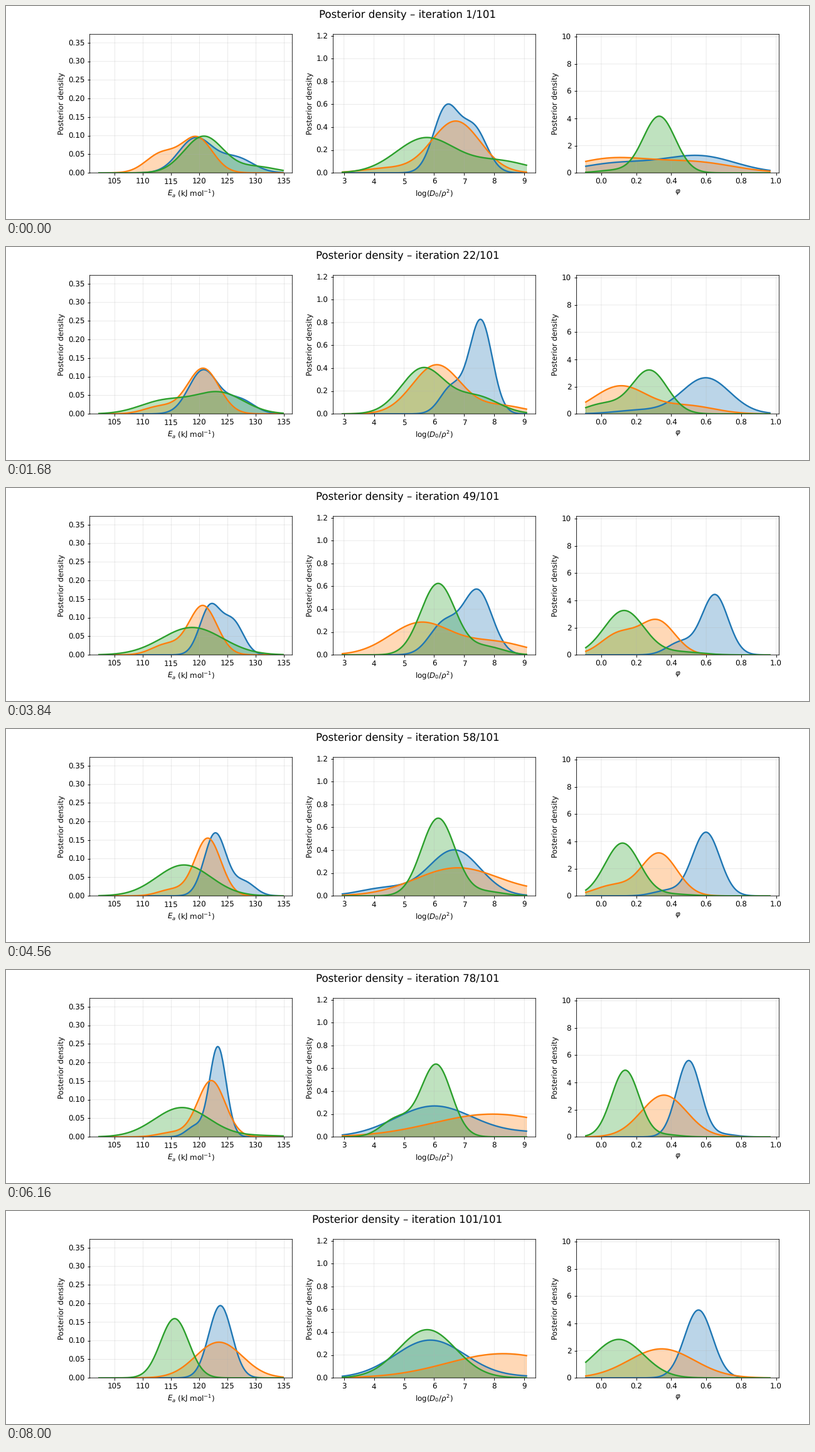
Write a matplotlib script that moves like this. It is 1280 px wide and 341 px high and loops after 8080 ms.

```python
import numpy as np
import matplotlib.pyplot as plt
from matplotlib.animation import FuncAnimation

W, H = 1280, 341
DPI = W / 15
STEPS, INTERVAL = 101, 80
KEY_STEPS = [0, 21, 31, 48, 66, 77, 100]
BLUE, ORANGE, GREEN = "tab:blue", "tab:orange", "tab:green"

# Unsnapped thin lines keep the soft look of a scaled-down figure.
plt.rcParams.update({"font.family": "DejaVu Sans", "text.hinting": "none",
                     "path.snap": False, "axes.linewidth": 0.72,
                     "grid.linewidth": 0.72})
fig = plt.figure(figsize=(15, H / DPI), dpi=DPI)
title = fig.suptitle("", fontsize=14)
chains = []


def panel(column, label, lo, hi, top):
    """Axes whose data span lo..hi, with a 5 % margin on both sides."""
    left = 133.5 + 388 * column
    ax = fig.add_axes([left / W, 1 - 267.2 / H, 322.8 / W, 221.9 / H])
    pad = 0.05 * (hi - lo)
    ax.set(xlim=(lo - pad, hi + pad), ylim=(0, top),
           xlabel=label, ylabel="Posterior density")
    ax.grid(alpha=0.3)
    return ax, np.linspace(lo, hi, 300)


def chain(target, color, *keys):
    """Each key holds centre, bandwidth and, if any, the side share."""
    ax, x = target
    line, = ax.plot(x, 0 * x, color=color, lw=2)
    area, = ax.fill(x, 0 * x, color=color, alpha=0.3, lw=1)
    tracks = np.transpose([(*key, 0)[:3] for key in keys])
    chains.append((x, line, area, tracks))


def density(x, centre, width, share):
    """Unit-area mix of a main and a side cluster with one bandwidth.

    The sign of share picks the side; smaller clusters sit further out.
    """
    weight = abs(share)
    z = (x - centre) / width
    offset = np.sign(share) * (3 - 2 * weight)
    bell = lambda u: np.exp(-u * u / 2) / (width * np.sqrt(2 * np.pi))
    return (1 - weight) * bell(z) + weight * bell(z - offset)


energy = panel(0, r"$E_a$ (kJ mol$^{-1}$)", 102.2, 134.8, 0.373)
chain(energy, BLUE, (119.3, 3, .3), (120.65, 2.55, .25), (122.1, 1.72, -.2),
      (121.9, 1.85, .4), (123.7, 2.03, -.04), (123.25, 1.48, -.1),
      (123.7, 2.05))
chain(energy, ORANGE, (119.55, 2.75, -.35), (120.65, 2.8, -.14),
      (121.4, 2.8, -.33), (120.6, 2.5, -.17), (122.35, 2.15, -.02),
      (122.1, 2.45, -.07), (123.45, 4.15))
chain(energy, GREEN, (120.75, 3.48, .14), (123.5, 4.35, -.38),
      (118.7, 3.5, -.33), (118.7, 5.4), (115.8, 4.18), (116.9, 4.85, .04),
      (115.6, 2.5))

diffusion = panel(1, r"log$(D_0/\rho^2)$", 2.947, 9.07, 1.213)
chain(diffusion, BLUE, (6.4, .425, .4), (7.55, .38, -.22), (7.6, .345, -.2),
      (7.45, .48, -.33), (5.9, 1.22, .04), (6, 1.3, .12), (5.87, 1.17, .03))
chain(diffusion, ORANGE, (6.72, .81, -.08), (6.08, .8, .14), (5.55, .9, .22),
      (5.55, 1.02, .28), (8, 1.78), (7.95, 2), (8.3, 1.88))
chain(diffusion, GREEN, (5.72, .98, .25), (5.63, .73, .27), (5.85, .47, .06),
      (6.13, .575, .1), (6.14, .54), (6.07, .505, -.2), (5.77, .945))

order = panel(2, r"$\varphi$", -.0889, .9643, 10.18)
chain(order, BLUE, (.56, .207, -.36), (.598, .137, -.09), (.636, .099, -.08),
      (.65, .075, -.17), (.548, .083, .02), (.5, .069, .03), (.556, .08))
chain(order, ORANGE, (.06, .222, .42), (.11, .152, .22), (.335, .115, -.42),
      (.322, .1, -.38), (.338, .106), (.358, .13), (.345, .187))
chain(order, GREEN, (.331, .092, -.04), (.275, .102, -.18), (.05, .123, .4),
      (.13, .115, .06), (.112, .0845), (.137, .079, .03), (.1, .141))


def update(step):
    title.set_text(f"Posterior density – iteration {step + 1}/{STEPS}")
    for x, line, area, tracks in chains:
        y = density(x, *(np.interp(step, KEY_STEPS, t) for t in tracks))
        line.set_data(x, y)
        area.set_xy(np.column_stack([np.r_[x[0], x, x[-1]], np.r_[0, y, 0]]))


anim = FuncAnimation(fig, update, frames=STEPS, interval=INTERVAL,
                     init_func=lambda: update(0), repeat=True, repeat_delay=0)
plt.show()
```
